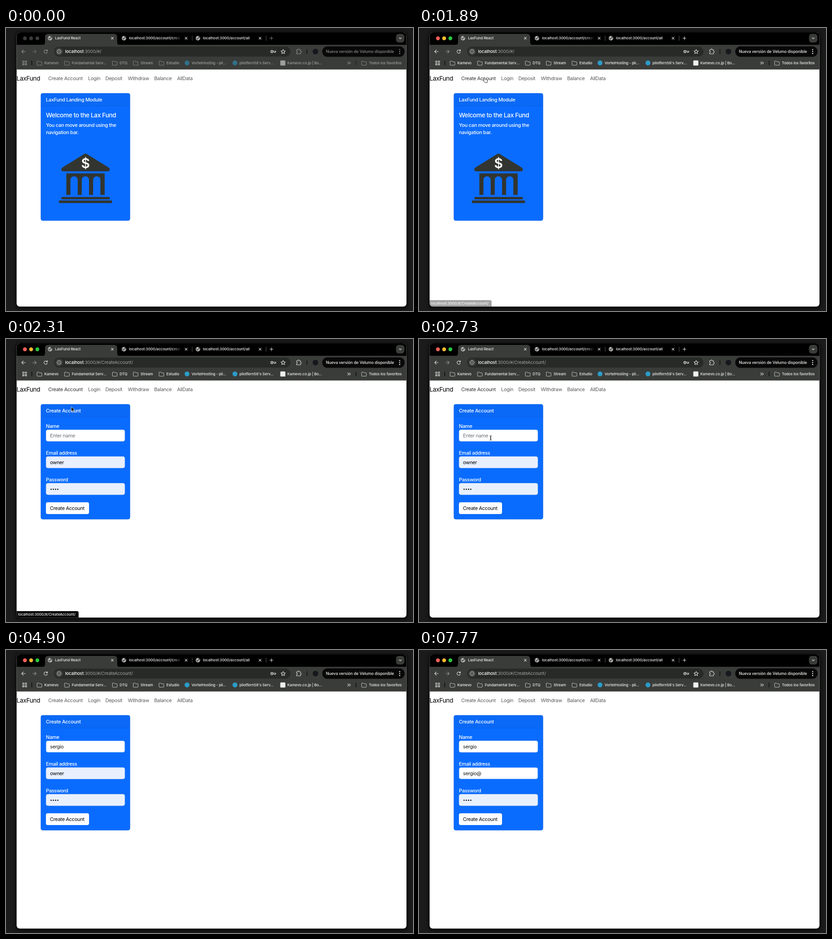
Animation of 897 by 624 pixels, one loop 8000 ms. Source, as an HTML page:

```html
<!DOCTYPE html>
<html lang="es">
<head>
<meta charset="utf-8">
<title>Account demo</title>
<style>
html, body { margin: 0; width: 100%; height: 100%; overflow: hidden; background: #1b1b1c; }
svg { display: block; font-family: Inter, "Liberation Sans", sans-serif; }
text { white-space: pre; }
.ui { font-size: 8.2px; font-weight: 500; letter-spacing: -.012em; fill: #f1f1ef; }
.url { font-size: 9.58px; letter-spacing: -.01em; fill: #a3a4a1; }
.page { font-size: 10.95px; letter-spacing: -.03em; }
.big { font-size: 13.7px; letter-spacing: -.033em; }
.line { fill: none; stroke: #dededb; stroke-width: 1.1; stroke-linecap: round; stroke-linejoin: round; }
.folder { fill: none; stroke: #c4c5c2; stroke-width: 1; stroke-linejoin: round; }
.link { fill: rgba(0, 0, 0, .65); }
.card { fill: #0a6cff; stroke: #0a5de0; stroke-width: .7; }
.box { fill: #fff; stroke: #dee2e6; stroke-width: .7; }
.auto { fill: #e8f0fe; }
.white { fill: #fff; font-weight: 450; }

.dim, .lights, .hover, .landing, .form, .status, .cursor, .arrow, .hand, .beam, .name-box, .mail-box {
  animation: 8s linear infinite;
}
.dim { animation-name: dim; }
.lights { animation-name: lights; }
.hover { animation-name: hover; }
.landing { animation-name: landing; }
.form { animation-name: form; }
.status { animation-name: status; }
.cursor { animation-name: move; }
.arrow { animation-name: arrow; }
.hand { animation-name: hand; }
.beam { animation-name: beam; }
.name-box { animation-name: name-focus; }
.mail-box { animation-name: mail-focus; }
.landing, .form, .arrow, .hand, .beam { animation-timing-function: step-end; }

@keyframes dim { 0%, 15.75% { opacity: .55 } 17.5%, 100% { opacity: 1 } }
@keyframes lights { 0%, 15.75% { opacity: 0 } 17.5%, 100% { opacity: 1 } }
@keyframes hover {
  0%, 19.4% { fill: rgba(0, 0, 0, .65) }
  21.8%, 35% { fill: rgba(0, 0, 0, .82) }
  36.75%, 100% { fill: rgba(0, 0, 0, .65) }
}
@keyframes landing { 0% { opacity: 1 } 24.4%, 100% { opacity: 0 } }
@keyframes form { 0% { opacity: 0 } 24.4%, 100% { opacity: 1 } }
@keyframes status {
  0%, 22.8% { opacity: 0 } 23.625% { opacity: .36 } 25.3%, 30.6% { opacity: 1 } 33.2%, 100% { opacity: 0 }
}
@keyframes move {
  0%, 5.2% { transform: translate(281px, 415px); animation-timing-function: step-end }
  5.21%, 7.9% { transform: translate(228px, 271px); animation-timing-function: ease-in-out }
  13.2% { transform: translate(139px, 105px) }
  14.8%, 26.25% { transform: translate(143px, 107px) }
  28.875% { transform: translate(144px, 149px); animation-timing-function: ease-out }
  33.5%, 100% { transform: translate(158px, 218px) }
}
@keyframes arrow { 0% { opacity: 0 } 4.3% { opacity: 1 } 20% { opacity: 0 } 27.2% { opacity: 1 } 31.5%, 100% { opacity: 0 } }
@keyframes hand { 0% { opacity: 0 } 20% { opacity: 1 } 27.2%, 100% { opacity: 0 } }
@keyframes beam { 0% { opacity: 0 } 31.5% { opacity: 1 } 45.4%, 100% { opacity: 0 } }
@keyframes name-focus { 0%, 35% { stroke: #dee2e6 } 36.75%, 61.4% { stroke: #86b7fe } 63.8%, 100% { stroke: #dee2e6 } }
@keyframes mail-focus { 0%, 61.4% { stroke: #dee2e6 } 63.8%, 100% { stroke: #86b7fe } }
</style>
</head>
<body>
<svg width="897" height="624" viewBox="0 0 897 624">
  <defs>
    <clipPath id="win"><rect x="23.4" y="10" width="859.2" height="604.3" rx="7"/></clipPath>
    <filter id="soft" x="-5%" y="-5%" width="110%" height="110%"><feGaussianBlur stdDeviation="4"/></filter>
    <linearGradient id="fade" gradientUnits="userSpaceOnUse" x1="368" x2="386" y1="0" y2="0">
      <stop stop-color="#f1f1ef"/><stop offset="1" stop-color="#f1f1ef" stop-opacity="0"/>
    </linearGradient>
    <path id="folder" class="folder" d="M.5 2q0-1 1-1h3l1.3 1.5h4.2q1 0 1 1v5.5q0 1-1 1H1.5q-1 0-1-1z"/>
    <g id="globe">
      <circle r="4.9" fill="#b4b5b2"/>
      <path d="M-3.6-1.5q1.6 2.4 3.2 1.2t2.2-1-1-2.2l.6-1.6q2.6 1 3 3.6l-1.6 1.5-2 .2-1.3 3.3q-2-.2-1.4-2.2l-2.4-1z" fill="#4b4c49"/>
    </g>
    <path id="close" class="line" d="M-2.3-2.3l4.6 4.6m0-4.6l-4.6 4.6"/>
    <path id="arch" d="M0 368.5V335a8 8 0 0 1 16 0v33.5z" fill="#0a6cff"/>
    <g id="head">
      <path d="M77.3 172V148q0-3.7 3.7-3.7h188q3.7 0 3.7 3.7v24z" fill="#0a69f6"/>
      <path d="M77 172.2h196" stroke="#0a5de0" stroke-width=".7"/>
    </g>
  </defs>

  <rect width="897" height="624" fill="#1b1b1c"/>
  <rect x="22" y="10" width="862" height="608" rx="8" filter="url(#soft)" opacity=".8"/>

  <g clip-path="url(#win)">
    <rect x="23" y="10" width="860" height="605" fill="#fff"/>
    <rect x="23" y="10" width="860" height="28"/>
    <rect x="23" y="37" width="860" height="54.5" fill="#3a3c39"/>

    <!-- tab strip -->
    <path d="M80 37.5q6 0 6-6V20q0-7 7-7H238q7 0 7 7v11.5q0 6 6 6z" fill="#3a3c39"/>
    <g fill="#3b3b3b"><circle cx="41.7" cy="22.7" r="4.2"/><circle cx="55.4" cy="22.7" r="4.2"/><circle cx="69.1" cy="22.7" r="4.2"/></g>
    <g class="lights">
      <circle cx="41.7" cy="22.7" r="4.2" fill="#ff5f57"/><circle cx="55.4" cy="22.7" r="4.2" fill="#febc2e"/><circle cx="69.1" cy="22.7" r="4.2" fill="#28c840"/>
    </g>
    <use href="#globe" x="97" y="22.5"/><use href="#globe" x="260" y="22.5"/><use href="#globe" x="423" y="22.5"/>
    <text class="ui" x="108" y="25.4">LaxFund React</text>
    <text class="ui" x="271" y="25.4" style="fill:url(#fade)">localhost:3000/account/create</text>
    <text class="ui" x="434" y="25.4">localhost:3000/account/all</text>
    <use href="#close" x="234.3" y="22.5"/><use href="#close" x="397" y="22.5"/><use href="#close" x="560" y="22.5"/>
    <path d="M410.3 17v11M573.3 17v11" stroke="#555" fill="none"/>
    <rect x="859.5" y="13" width="18.5" height="19" rx="6" fill="#3a3c39"/>
    <path class="line" d="M866.5 21.5l2.4 2.4 2.4-2.4"/>

    <!-- toolbar -->
    <rect x="106" y="41" width="521" height="22" rx="11" fill="#282a27"/>
    <circle cx="117" cy="52" r="8.5" fill="#3a3c39"/>
    <circle class="line" cx="117" cy="52" r="4.2"/><path class="line" d="M117 51.8v2M117 49.8v.1"/>
    <text class="url" x="130.3" y="55.4"><tspan fill="#fff" font-weight="500">localhost</tspan>:3000/#/<tspan class="form">CreateAccount/</tspan></text>
    <g class="line">
      <circle cx="586" cy="52" r="2.6"/><path d="M588.6 51h6v2.2h-4.6M592.5 53.2v1.3"/><circle cx="586" cy="52" r=".4"/>
      <path d="M610.8 47.2l1.4 3.2 3.5.3-2.7 2.3.9 3.4-3.1-1.8-3.1 1.8.9-3.4-2.7-2.3 3.5-.3z"/>
    </g>
    <circle cx="682" cy="52" r="6.2" fill="#15191d"/>
    <rect x="697" y="40.5" width="181.5" height="23" rx="11.5" fill="#080808"/>
    <path d="M56.8 72v10M663.3 47v10" stroke="#0c0c0c" stroke-width="1.4"/>
    <g class="dim">
      <path class="line" d="M42.6 52h-8m3.6-3.6L34.6 52l3.6 3.6"/>
      <path class="line" opacity=".55" d="M58.6 52h8m-3.6-3.6l3.6 3.6-3.6 3.6"/>
      <path class="line" d="M90.7 50a3.7 3.7 0 1 0 .4 3M91.3 47.6v2.8h-2.8"/>
      <path class="line" d="M581.6 22.5h6.8m-3.4-3.4v6.8"/>
      <path class="line" d="M640.5 48h2.7q.2-2 1.6-2t1.6 2h2.6v3q2 .2 2 1.6t-2 1.6v2.8h-8.5v-2.8q1.8-.3 1.8-1.6t-1.8-1.6z"/>
      <text class="ui" x="705" y="55.2" style="font-size:8.85px">Nueva versión de Velumo disponible</text>
      <g fill="#f1f1ef"><circle cx="867.6" cy="47.8" r="1.2"/><circle cx="867.6" cy="52" r="1.2"/><circle cx="867.6" cy="56.2" r="1.2"/></g>
      <path class="line" d="M36.7 72.7h3v3h-3zM42.4 72.7h3v3h-3zM36.7 78.4h3v3h-3zM42.4 78.4h3v3h-3z"/>
      <g id="marks"></g>
      <circle cx="399" cy="77" r="5.4" fill="#2b9cc8"/><circle cx="504.6" cy="77" r="5.4" fill="#2b9cc8"/>
      <rect x="604.5" y="71.5" width="11.2" height="11.2" rx="1.5" fill="#f0f0ee"/>
      <path class="line" d="M753 74.7l2.5 2.5-2.5 2.5m3.6-5l2.5 2.5-2.5 2.5"/>
      <path d="M771.5 72v10" stroke="#0c0c0c" stroke-width="1.4"/>
    </g>

    <!-- page -->
    <text class="big" x="23.2" y="115.8">LaxFund</text>
    <g class="page link">
      <text class="hover" x="93" y="115">Create Account</text>
      <text x="181" y="115">Login</text><text x="219" y="115">Deposit</text><text x="268.5" y="115">Withdraw</text>
      <text x="326.5" y="115">Balance</text><text x="377" y="115">AllData</text>
    </g>

    <g class="landing">
      <rect class="card" x="76.9" y="144" width="196.3" height="280.5" rx="4"/>
      <use href="#head"/>
      <g class="page white">
        <text x="88" y="162.3">LaxFund Landing Module</text>
        <text class="big" x="88" y="196.8" font-weight="500">Welcome to the Lax Fund</text>
        <text x="88" y="217.6">You can move around using the</text>
        <text x="88" y="234">navigation bar.</text>
      </g>
      <g fill="#323530">
        <path d="M172.5 277.8q2.7-1.6 5.4 0L226 307.5q3.500 2.300 2.600 5.500-.8 3-4 3H126q-3.400 0-4-3-.7-3.200 2.600-5.500z"/>
        <rect x="133" y="320.5" width="84.5" height="47.6"/>
        <rect x="122" y="372.5" width="107" height="5.2" rx="2"/>
        <rect x="116.5" y="380.3" width="117.3" height="5.6" rx="2"/>
      </g>
      <use href="#arch" x="142"/><use href="#arch" x="167"/><use href="#arch" x="192"/>
      <text x="175.3" y="308.8" text-anchor="middle" font-size="30" font-weight="600" fill="#fff">$</text>
    </g>

    <g class="form">
      <rect class="card" x="76.9" y="144" width="196.3" height="253.3" rx="4"/>
      <use href="#head"/>
      <g class="page white">
        <text x="88" y="162.3">Create Account</text>
        <text x="88" y="195.6">Name</text><text x="88" y="254.6">Email address</text><text x="88" y="313.5">Password</text>
      </g>
      <rect class="box name-box" x="88.4" y="200.3" width="173.3" height="25.1" rx="4"/>
      <rect class="box mail-box auto" id="mailBox" x="88.4" y="259.2" width="173.3" height="25.1" rx="4"/>
      <rect class="box auto" x="88.4" y="318.1" width="173.3" height="25.1" rx="4"/>
      <rect id="pick" x="97" y="265" width="30" height="14" fill="#b3d7ff"/>
      <g class="page">
        <text id="name" x="97" y="217"></text>
        <text id="mail" x="97" y="275.9"></text>
      </g>
      <rect id="caret" width="1" height="13" fill="#111"/>
      <g fill="#111"><circle cx="99.4" cy="331.3" r="1.4"/><circle cx="104.3" cy="331.3" r="1.4"/><circle cx="109.2" cy="331.3" r="1.4"/><circle cx="114.1" cy="331.3" r="1.4"/></g>
      <rect x="88" y="360" width="95" height="26" rx="4" fill="#fbfcfd"/>
      <text class="page" x="96.8" y="377">Create Account</text>
    </g>

    <g class="status">
      <path d="M23 600h133.5q3.5 0 3.5 3.5V615H23z" fill="#060606"/>
      <text class="ui" x="26.5" y="610.4" style="font-size:8.05px">localhost:3000/#/CreateAccount/</text>
    </g>
  </g>

  <g class="cursor">
    <path class="arrow" d="M0 0v10.2l2.4-2.1 1.7 3.7 1.8-.8-1.6-3.6h3.1z" stroke="#fff" stroke-width=".8"/>
    <path class="hand" transform="translate(-1.300 .600)" d="M.2 2.5q1.2-1 2 .6l1.2 2.8q2-1 2.6.3 1.6-.6 2 .6 1.2 0 1.2 1.8l-.4 4H4L-.6 8.5q-.6-1.6 1.5-.8l.7.5L-.1 4z" fill="#fff" stroke="#111" stroke-width=".9"/>
    <path class="beam" d="M-2-4.8q2 0 2 1.600v6.800q0 1.600-2 1.600m4-10q-2 0-2 1.600v6.800q0 1.600 2 1.600" fill="none" stroke="#111"/>
  </g>
</svg>
<script>
const $ = id => document.getElementById(id);
const LOOP = 8000, BLINK = 490, SLACK = 10;

const bookmarks = [
  [68, "Kamevo", 1], [128.5, "Fundamental Serv...", 1], [234, "DTQ", 1], [280, "Stream", 1], [336.8, "Estudio", 1],
  [392.5, "VortelHosting - pil..."], [498, "pilotfern58's Serv..."], [603.5, "Kamevo.co.jp | Bo..."], [783.2, "Todos los favoritos", 1]
];
$("marks").innerHTML = bookmarks.map(([x, label, folder]) =>
  (folder ? `<use href="#folder" x="${x}" y="72"/>` : "") +
  `<text class="ui" x="${x + 16.6}" y="80">${label}</text>`).join("");

const nameKeys = [3640, 3710, 3920, 4130, 4270, 4340];
const mailKeys = [5810, 5880, 6090, 6230, 6440, 6510, 7280];
const FOCUS = 2870, TAB = 4970;

const typed = (word, keys, t) => word.slice(0, keys.filter(k => k <= t).length);

function put(el, text) {
  if (el.textContent !== text) el.textContent = text;
}

function draw(t) {
  const name = typed("sergio", nameKeys, t), mail = typed("sergio@", mailKeys, t);
  const inMail = t >= TAB, picked = inMail && !mail;
  put($("name"), name || "Enter name");
  $("name").style.fill = name ? "#16181a" : "#6c7075";
  put($("mail"), mail || "owner");
  $("mail").style.fill = mail ? "#16181a" : "#000";
  $("mailBox").style.fill = mail ? "#fff" : "#e8f0fe";
  $("pick").style.opacity = +picked;

  const last = Math.max(...[FOCUS, ...nameKeys, ...mailKeys].filter(k => k <= t));
  const shown = t >= FOCUS && !picked && (t - last) % (2 * BLINK) < BLINK;
  const text = inMail ? mail : name;
  const width = text ? $(inMail ? "mail" : "name").getComputedTextLength() : 0;
  $("caret").setAttribute("x", 97 + width);
  $("caret").setAttribute("y", inMail ? 265.5 : 206.5);
  $("caret").style.opacity = +shown;
}

let start;
function tick(now) {
  start ??= now;
  draw((now - start + SLACK) % LOOP);
  requestAnimationFrame(tick);
}
draw(0);
requestAnimationFrame(tick);
</script>
</body>
</html>
```
